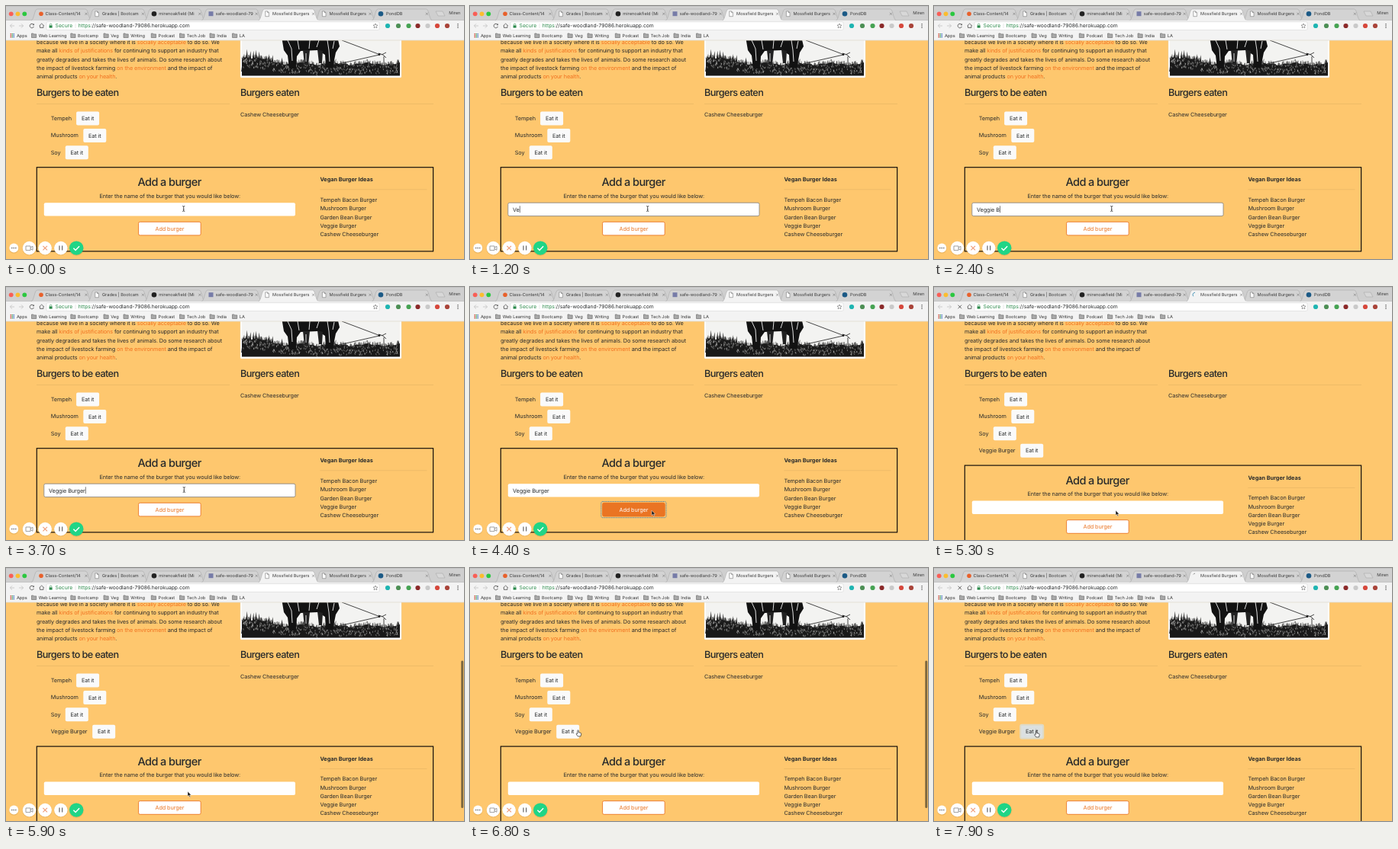
Write an HTML page that moves like this. It is 600 px wide and 332 px high and loops after 8 s.

```html
<!DOCTYPE html>
<html lang="en">
<head>
<meta charset="utf-8">
<title>Burger list</title>
<style>
  html, body { margin: 0; width: 100%; height: 100%; overflow: hidden; }
  svg { display: block; width: 100vw; height: 100vh; }
  text { font: 7.27px Inter, Roboto, sans-serif; letter-spacing: -.013em; fill: #272a2b;
         text-rendering: geometricPrecision; white-space: pre; }
  .h3 { font-size: 12.7px; font-weight: 500; letter-spacing: -.048em; }
  .h2 { font-size: 14.5px; font-weight: 500; letter-spacing: -.04em; }
  .bold { font-weight: 700; letter-spacing: 0; }
  .mid { text-anchor: middle; }
  .link { fill: #f0701f; }
  .tab { font-size: 5.65px; letter-spacing: 0; fill: #3c3c3c; }
  .mark { font-size: 5.7px; letter-spacing: -.01em; fill: #333; }
  .url { font-size: 6.75px; letter-spacing: 0; }
  .green { fill: #2b8a4b; }
</style>
</head>
<body>
<svg id="stage" viewBox="0 0 600 332" preserveAspectRatio="none"></svg>
<script>
const LOOP = 8000, FRAME = 100, ROW = 22.4;
const PHRASE = "Veggie Burger";
const KEYS = [1000, 1150, 1350, 1500, 1700, 1850, 2050, 2300, 2600, 2750, 2900, 3100, 3250];

const text = (x, y, s, cls = "", extra = "") => `<text x="${x}" y="${y}" class="${cls}" ${extra}>${s}</text>`;
const rect = (x, y, w, h, fill, extra = "") =>
  `<rect x="${x}" y="${y}" width="${w}" height="${h}" fill="${fill}" ${extra}/>`;
const circle = (x, y, r, fill, extra = "") => `<circle cx="${x}" cy="${y}" r="${r}" fill="${fill}" ${extra}/>`;
const path = (d, stroke, width = 1, extra = 'fill="none"') =>
  `<path d="${d}" stroke="${stroke}" stroke-width="${width}" ${extra}/>`;
const shape = (d, fill) => path(d, "none", 0, `fill="${fill}"`);
const group = (id, body) => `<g id="${id}">${body}</g>`;
const link = s => `<tspan class="link">${s}</tspan>`;
const rule = (x, y, w) => rect(x, y, w, .6, "#000", 'opacity=".11"');

function randomizer(seed) {
  return () => (seed = (seed * 16807) % 2147483647) / 2147483647;
}

function sheetIcon(x) {
  return path(`M${x - 2.2} 6.9h2.8l1.8 1.8v5h-4.6zM${x + .6} 6.9v1.8h1.8`, "#777", .6, 'fill="#fff"');
}

function tabShape(x, fill) {
  return path(`M${x - 1} 19C${x + 3} 18 ${x + 3} 4 ${x + 7} 4H${x + 70}C${x + 74} 4 ${x + 74} 18 ${x + 78} 19`,
    "#a9a9a9", .6, `fill="${fill}"`);
}

function browser() {
  const tabs = [
    ["Class-Content/14", circle(46, 10.2, 2.8, "#e8612c")],
    ["Grades | Bootcam", sheetIcon(119)],
    ["mirenoakfield (Mi", circle(194, 10.2, 3.3, "#222")],
    ["safe-woodland-79", rect(265.5, 7.2, 6, 6, "#777ca8")],
    ["Mossfield Burgers", group("favicon", sheetIcon(342))],
    ["Mossfield Burgers", sheetIcon(416.6)],
    ["PondDB", circle(491, 10.2, 3.3, "#1c5a86")]
  ];
  const order = [0, 1, 2, 3, 5, 6, 4];
  const strip = order.map(i => {
    const x = 34 + 74.4 * i, cx = x + 71;
    return tabShape(x, i === 4 ? "#f3f3f3" : "#d3d3d3") + tabs[i][1] +
      text(x + 17.5, 12.4, tabs[i][0], "tab") +
      path(`M${cx - 1.5} 8.8l3 3m0-3l-3 3`, "#777", .65);
  }).join("");

  const marks = [["Web Learning", 33.5], ["Bootcamp", 84.8], ["Veg", 128], ["Writing", 154], ["Podcast", 190.3],
    ["Tech Job", 227.5], ["India", 267], ["LA", 296.5]];
  const folders = marks.map(([name, x]) =>
    path(`M${x} 36h2.2l.8.9h3.2v4.6h-6.2z`, "#666", .6, 'fill="#a9a9a9"') + text(x + 9.3, 41, name, "mark")).join("");

  const appDots = [0, 1, 2, 3, 4, 5, 6, 7, 8].map(i =>
    rect(5.6 + 2 * (i % 3), 36 + 2 * Math.floor(i / 3), 1.4, 1.4, ["#d84a3a", "#4a9b58", "#4a78c8"][i % 3])).join("");

  const extras = [[500, "#1fb5b2"], [514, "#4d8f55"], [527.5, "#46a353"], [539.5, "#8b2a2a"], [552.5, "#c9c9c9"],
    [565, "#d6483c"], [578, "#a9443a"]].map(([x, c]) => circle(x, 26, 3.1, c)).join("");

  return rect(0, 0, 600, 19, "#cfcfcf") + rect(0, 0, 600, .7, "#bdbdbd") +
    ["#f95f57", "#fbbd2f", "#2bc840"].map((c, i) => circle(6.7 + 8.8 * i, 10.3, 2.9, c)).join("") +
    path("M0 19H600", "#adadad", .6) + strip +
    path("M563 7h9l3 6h-9z", "#aaa", .6, 'fill="#d8d8d8"') + text(580.3, 11.4, "Miren", "tab") +
    rect(0, 19.2, 600, 26, "#f3f3f3") + rect(335, 18.5, 75, 1.2, "#f3f3f3") +
    rect(53, 20.7, 436, 10.8, "#fff", 'rx="1.5" stroke="#d0d0d0" stroke-width=".5"') +
    path("M11 26H5.5M8 23.4L5.4 26 8 28.6M17 26h5.5M20 23.4l2.6 2.6-2.6 2.6", "#c6c6c6", .9) +
    group("reload", path("M36.1 24.5A2.7 2.7 0 1 0 36.4 27", "#555", .9) + shape("M36.9 23v2.2h-2.2z", "#555")) +
    group("stop", path("M31.5 23.7l4.6 4.6m0-4.6l-4.6 4.6", "#555", .9)) +
    path("M43.5 26l3.2-2.9 3.2 2.9M44.5 25.5v3h4.4v-3", "#555", .8) +
    rect(56.6, 25.4, 4, 3.2, "#2b8a4b") + path("M57.4 25.4v-1a1.2 1.2 0 0 1 2.4 0v1", "#2b8a4b", .6) +
    text(64.6, 28.4, "Secure", "url green") + path("M91 23v6", "#ccc", .5) +
    text(94.8, 28.4, '<tspan class="green">https</tspan>://safe-woodland-79086.herokuapp.com', "url") +
    path("M484 23l.9 2 2.1.2-1.6 1.5.5 2.1-1.9-1.1-1.9 1.1.5-2.1-1.6-1.5 2.1-.2z", "#666", .6) +
    extras + [23.8, 26, 28.2].map(y => circle(592, y, .75, "#555")).join("") +
    appDots + text(14, 41, "Apps", "mark") + folders + path("M0 45H600", "#d2c8b4", .5);
}

function ridge(x) {
  return 76 - 9 * Math.exp(-(((x - 318) / 30) ** 2)) + 1.2 * Math.sin(x / 7) + .9 * Math.sin(x / 2.3);
}

function engraving() {
  const rnd = randomizer(41);
  const near = (x, spread) => (x + (rnd() - .5) * spread).toFixed(1);
  let grass = "", glints = "", spruces = "", hill = "M309 91.5";
  for (let x = 309; x <= 516; x += 3) hill += `L${x} ${ridge(x).toFixed(1)}`;
  for (let x = 311; x < 364; x += 4.2) {
    const tip = ridge(x) - 3 - rnd() * 8;
    spruces += `M${x - 2.8} 86L${near(x, 2)} ${tip.toFixed(1)}L${x + 2.8} 86z`;
  }
  for (let i = 0; i < 300; i++) {
    const x = 310 + rnd() * 205, gx = 310 + rnd() * 205;
    grass += `M${x.toFixed(1)} ${near(ridge(x) + 3, 5)}l${near(0, 3)} -5`;
    glints += `M${gx.toFixed(1)} ${near(ridge(gx) + 8, 12)}l${near(0, 2.4)} -2.2`;
  }
  const cow = "M361 40H434L437 53 432 61 428 81H419L418 64 408 58 386 59 381 66 380 82H371L369 65 364 58z";
  return group("picture",
    rect(307, 30, 211, 64, "#fff", 'rx="1.5" stroke="#e7dbc4" stroke-width=".5"') + rect(309, 32, 207, 59.5, "#f3f3f1") +
    shape(hill + "L516 91.5z", "#191919") + shape(spruces, "#191919") + path(grass, "#222", .55) +
    path(glints, "#dcdcd8", .45) + shape(cow, "#121212") +
    shape("M389 58l2 19h5l2-19M408 57l2 18h4l1-16", "#222") +
    path("M369 45l5 11 1 16M382 45l2 12M398 45l-1 11M410 45l-3 9M421 45l2 13 1 15M430 46l-2 10M393 62v11", "#ddd", 1) +
    path("M440 45L489 63.5M489 64L436 76M488 62l6 2 4 4M492 64l6-3M495 66v10", "#333", .9) + circle(489, 63.5, 1.5, "#222"));
}

function burger(name, i, buttonX) {
  const y = 149.9 + ROW * i;
  return text(58.8, y, name) +
    rect(buttonX, y - 11.4, 30, 18, "#fafafa", `rx="2" ${i === 3 ? 'id="lastButton"' : ""}`) +
    text(buttonX + 15, y + .2, "Eat it", "mid");
}

function page() {
  const lines = [
    `because we live in a society where it is ${link("socially acceptable")} to do so. We`,
    `make all ${link("kinds of justifications")} for continuing to support an industry that`,
    "greatly degrades and takes the lives of animals. Do some research about",
    `the impact of livestock farming ${link("on the environment")} and the impact of`,
    `animal products ${link("on your health")}.`
  ];
  const ideas = ["Tempeh Bacon Burger", "Mushroom Burger", "Garden Bean Burger", "Veggie Burger", "Cashew Cheeseburger"];
  const form = rect(40.3, 211.7, 519.3, 110.2, "none", 'stroke="#14100a" stroke-width="1.2"') +
    text(214.1, 236.3, "Add a burger", "h2 mid") +
    text(214.8, 251.6, "Enter the name of the burger that you would like below:", "mid") +
    rect(49.8, 258.2, 329.2, 17.4, "#fff", 'rx="2" id="field"') +
    text(56, 269.7, "", "", 'id="typed"') + rect(0, 262.3, .6, 9, "#222", 'id="caret"') +
    rect(171.8, 281.5, 85.2, 21.2, "none", 'rx="2" id="ring" stroke="#4379a8" stroke-width="1" stroke-dasharray="1 .8"') +
    rect(173.6, 283.3, 81.6, 17.6, "#fff", 'rx="2" id="addButton" stroke="#ea7423" stroke-width=".9"') +
    text(214.4, 295, "Add burger", "mid", 'id="addLabel"') +
    text(411.4, 230.2, "Vegan Burger Ideas", "bold") + rule(411.4, 240.6, 140) +
    ideas.map((s, i) => text(411.4, 257 + 11.25 * i, s)).join("");

  return rect(0, 45, 600, 287, "#fec76e") +
    lines.map((s, i) => text(40, 50.1 + 11.25 * i, s)).join("") + engraving() +
    text(40, 118.3, "Burgers to be eaten", "h3") + text(307, 118.3, "Burgers eaten", "h3") +
    rule(40, 128, 253) + rule(307, 128, 253) + text(307, 145, "Cashew Cheeseburger") +
    burger("Tempeh", 0, 92.1) + burger("Mushroom", 1, 101.3) + burger("Soy", 2, 77.8) +
    group("newBurger", burger("Veggie Burger", 3, 113.2)) + group("form", form);
}

function recorder() {
  const disc = (x, r, fill) => circle(x, 318.1, r + .4, "#8a5a10", 'opacity=".18"') + circle(x, 317.6, r, fill);
  return disc(10.3, 6, "#fff") + [7.8, 10.3, 12.8].map(x => circle(x, 317.6, .8, "#666")).join("") +
    disc(30.5, 8.8, "#fff") + path("M26 315h6v5.6h-6zM32 317l3-1.7v5l-3-1.7", "#8a8a8a", .8) +
    disc(51.2, 8.8, "#fff") + path("M48.4 314.8l5.6 5.6m0-5.6l-5.6 5.6", "#ef9a74", 1.1) +
    disc(71.8, 8.8, "#fff") + path("M70 314.6v6m3.6-6v6", "#666", 1.2) +
    disc(92.2, 9.2, "#20d586") + path("M88.4 317.8l2.7 2.7 5-5.2", "#fff", 1.5);
}

function pointers() {
  return group("beam", path("M-1.6-3.5Q0-3.5 0-2.5Q0-3.5 1.6-3.5M0-3V3M-1.6 3.5Q0 3.5 0 2.5Q0 3.5 1.6 3.5M-.8 .8H.8", "#222", .7)) +
    group("arrow", path("M0 0V6.4L1.5 5 2.6 7.4 3.7 6.9 2.6 4.6H4.6z", "#fff", .5, 'fill="#111"')) +
    group("hand", path("M-1.6 0V-3.2Q-.9-4.3-.2-3.2V-.8L2.6-.1Q3.3 .2 3.2 1.2L2.5 4.4H-1.3L-3.5 1.2Q-3-.1-1.6 1z", "#222", .7, 'fill="#fff"'));
}

const stage = document.getElementById("stage");
stage.innerHTML = page() + group("recorder", recorder()) +
  rect(596.2, 121.5, 3, 193.5, "#7d683f", 'rx="1.5" id="scrollbar"') + browser() +
  group("spinner", path("", "#777", .9, 'fill="none" id="arc"')) + pointers();

const el = {};
stage.querySelectorAll("[id]").forEach(node => el[node.id] = node);
const show = (name, on) => el[name].setAttribute("display", on ? "inline" : "none");
const set = (name, attrs) => Object.entries(attrs).forEach(([k, v]) => el[name].setAttribute(k, v));

function glide(t, from, to, a, b) {
  const p = Math.min(1, Math.max(0, (t - from) / (to - from)));
  const e = p * p * (3 - 2 * p);
  return a.map((v, i) => v + (b[i] - v) * e);
}

function pointerAt(t) {
  if (t < 5900) return glide(t, 3800, 4200, [t < 3500 ? 232.7 : 233.3, 266], [238, 293.3]);
  if (t < 7000) return glide(t, 5900, 6700, [238, 293.3], [142.5, 216.5]);
  return glide(t, 7000, 7400, [142.5, 216.5], [135, 217.5]);
}

function render(t) {
  const added = t >= 5300;
  const focused = t >= 700 && t < 4300;
  const hovering = t >= 4100 && t < 5300;
  const clicked = t >= 4300 && t < 5300;
  const waiting = (t >= 4500 && t < 5300) || t >= 7800;
  const loading = t >= 5300 && t < 5600;

  show("newBurger", added);
  set("form", { transform: `translate(0 ${added ? ROW : 0})` });
  show("picture", t < 5300 || t >= 5500);
  show("recorder", t < 5300 || t >= 5700);
  show("scrollbar", t >= 5700 && t < 7000);

  const count = added ? 0 : KEYS.filter(k => k <= t).length;
  el.typed.textContent = PHRASE.slice(0, count);
  const lastKey = count ? KEYS[count - 1] : 700;
  show("caret", focused && (t - lastKey) % 1000 < 500);
  set("caret", { x: 56.2 + (count ? el.typed.getComputedTextLength() : 0) });
  set("field", { stroke: focused ? "#8d8b86" : "none", "stroke-width": .9 });

  set("addButton", { fill: hovering ? "#ea7423" : "#fff" });
  el.addLabel.style.fill = hovering ? "#fff" : "#ea7423";
  show("ring", clicked);
  const pressed = t >= 7600;
  set("lastButton", { fill: pressed ? "#dbe0e0" : t >= 7100 ? "#e6e9e9" : "#fafafa",
    stroke: pressed ? "#dfdac4" : "none", "stroke-width": 2 });

  const busy = waiting || loading;
  show("stop", busy);
  show("reload", !busy);
  show("favicon", !busy);
  show("spinner", busy);
  set("spinner", { transform: `translate(342 10.2) rotate(${loading ? (t - 5300) * .36 : -(t % 100) * .36})` });
  set("arc", loading ? { d: "M0-3A3 3 0 0 0-2.2 2", stroke: "#3d8fb5" } : { d: "M0-3A3 3 0 0 0-2.4-1.8", stroke: "#888" });

  const [x, y] = pointerAt(t);
  const kind = t < 4000 ? "beam" : t < 6600 ? "arrow" : "hand";
  for (const name of ["beam", "arrow", "hand"]) {
    show(name, name === kind);
    set(name, { transform: `translate(${x} ${y})` });
  }
}

const start = performance.now();
function tick() {
  const t = (performance.now() - start) % LOOP;
  render(Math.floor(t / FRAME) * FRAME);
  requestAnimationFrame(tick);
}
tick();
</script>
</body>
</html>
```
